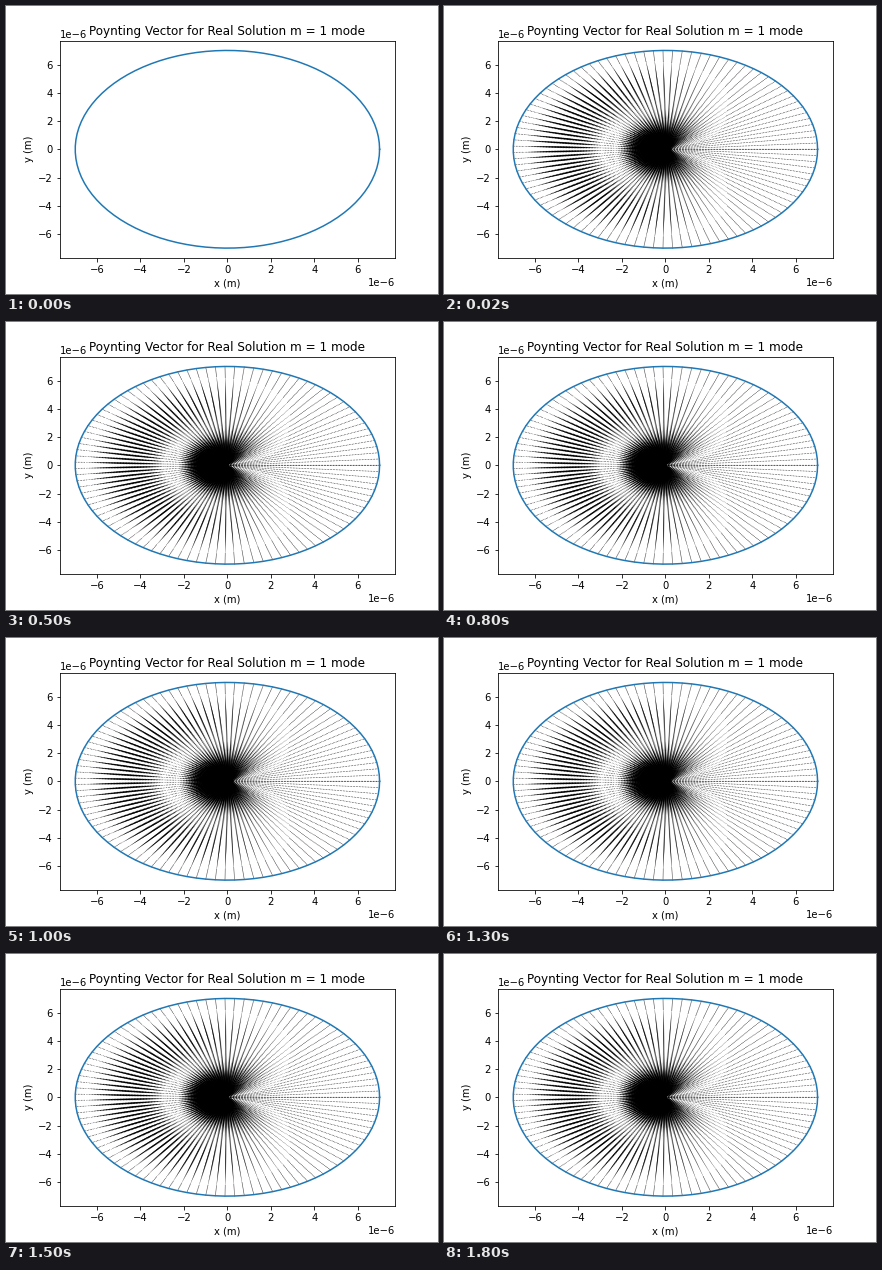
These frames come from a looping animation (432x288 px, 2000 ms). A matplotlib script:

```python
import numpy as np
import matplotlib.pyplot as plt
from matplotlib.animation import FuncAnimation

plt.rcParams.update({"font.family": "DejaVu Sans", "font.size": 10,
                     "figure.subplot.bottom": 0.125})

R = 7e-6         # waveguide radius
N = 100          # samples along the radius and around the circle
FRAMES, STEP, HOLD = 100, 20, 25

fig, ax = plt.subplots(figsize=(6, 4), dpi=72)

theta = np.linspace(0, 2 * np.pi, N)
ax.plot(R * np.cos(theta), R * np.sin(theta))
ax.set_xlim(-1.1 * R, 1.1 * R)
ax.set_ylim(-1.1 * R, 1.1 * R)
ax.set_title("Poynting Vector for Real Solution m = 1 mode", y=1.0)
ax.set_xlabel("x (m)")
ax.set_ylabel("y (m)")

# Ez = J_{1/2}(pi r / R) sin(theta / 2); the flux follows Ez * grad(Ez)
r, t = np.meshgrid(np.linspace(0, R, N), theta)
j2 = np.sinc(r / R) ** 2
s_r = (np.sinc(2 * r / R) - j2 / 2) * np.sin(t / 2) ** 2
s_t = j2 / 4 * np.sin(t)
u = s_r * np.cos(t) - s_t * np.sin(t)
v = s_r * np.sin(t) + s_t * np.cos(t)

fields = [ax.quiver(r * np.cos(t), r * np.sin(t), sign * u, sign * v, visible=False)
          for sign in (-1, 1)]


def update(i):
    phase = i // HOLD % 2
    for k, arrows in enumerate(fields):
        arrows.set_visible(i > 0 and k == phase)
    return fields


anim = FuncAnimation(fig, update, frames=FRAMES, interval=STEP,
                     init_func=lambda: update(0), repeat=True, repeat_delay=0)
plt.show()
```
